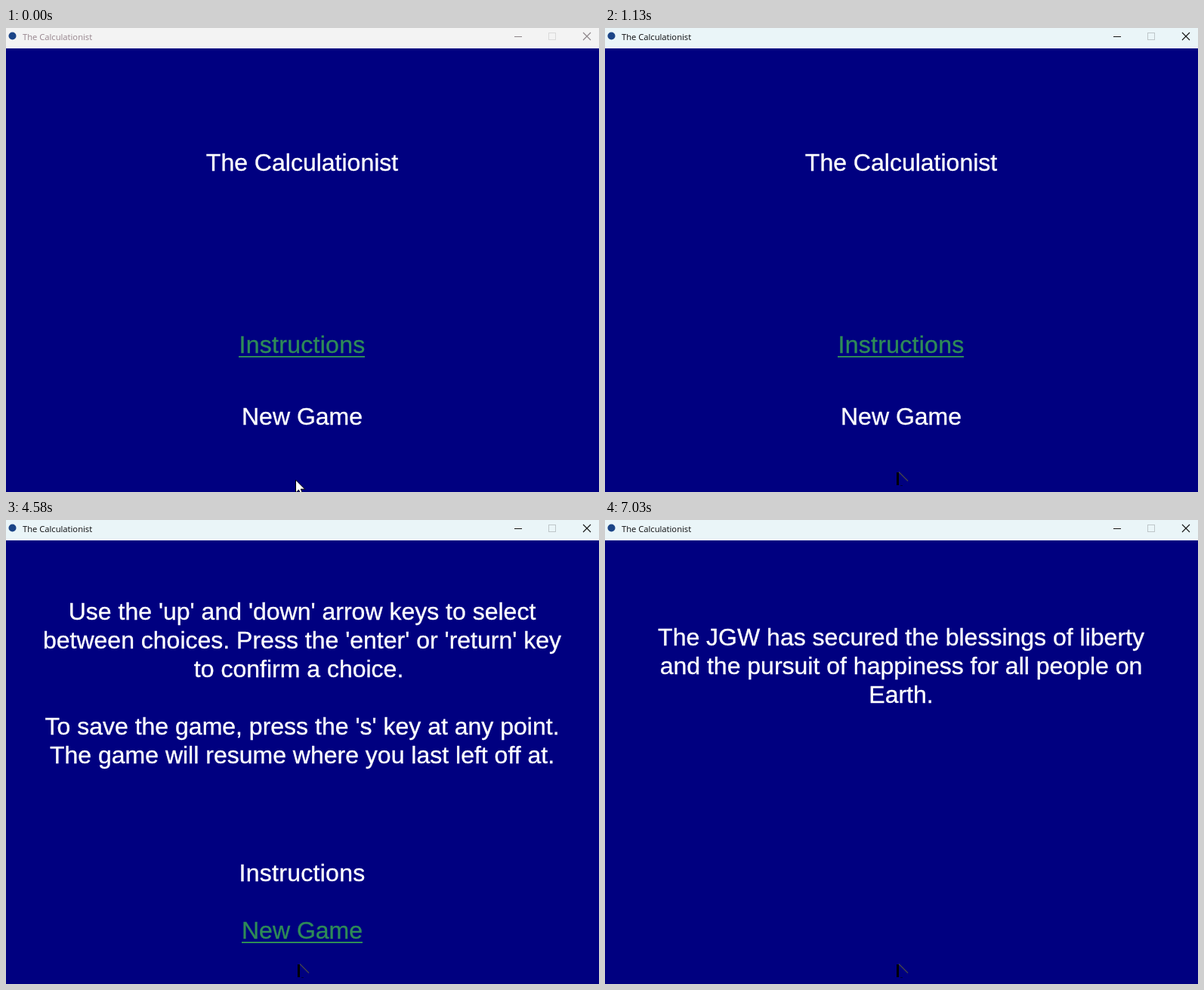
Recreate the animation shown at these times as an HTML page. Size 785 px wide and 614 px high, loop 8 s.

```html
<!DOCTYPE html>
<html lang="en">
<head>
<meta charset="utf-8">
<title>The Calculationist</title>
<style>
  html, body { margin: 0; width: 100%; height: 100%; overflow: hidden; background: #000080; }
  svg { display: block; width: 785px; height: 614px; }
  .big { font: 32px "Liberation Sans", Arial, sans-serif; text-anchor: middle; white-space: pre; stroke-width: .35px; }
  .caption { font: 11.2px "Open Sans", "Noto Sans", sans-serif; }
</style>
</head>
<body>
<svg id="stage" viewBox="0 0 785 614">
  <rect width="785" height="614" fill="#000080"/>
  <g id="scenes"></g>
  <rect id="bar" width="785" height="27"/>
  <circle cx="8.5" cy="10.5" r="5" fill="#1c4587"/>
  <text id="caption" class="caption" x="22" y="16">The Calculationist</text>
  <g id="buttons" fill="none">
    <path d="M673 11.5h10"/>
    <path d="M764 6l10 10M774 6l-10 10" stroke-width="1.1"/>
  </g>
  <rect id="box" x="718.5" y="6.5" width="9" height="9" fill="none"/>
  <path id="arrow" d="M0 0V17L4 13.2L6.6 19.4L9.4 18.2L6.8 12.2H12.2Z" fill="#fff" stroke="#000"/>
  <g id="ghost" fill="none">
    <path d="M387.5 588V605" stroke="#000" stroke-width="3"/>
    <path d="M389 587.5L401 599.5" stroke="#45454a" stroke-width="1.2"/>
    <path d="M391 605.5h3" stroke="#00003c"/>
  </g>
</svg>
<script>
const LOOP = 8000, MID = 392, PITCH = 38;
const $ = id => document.getElementById(id);

const help = [
  "Use the 'up' and 'down' arrow keys to select",
  "between choices. Press the 'enter' or 'return' key",
  "to confirm a choice. ",
  "",
  "To save the game, press the 's' key at any point.",
  "The game will resume where you last left off at."
];

// y: first baseline; menu: baselines of the two choices; pick: chosen entry
const scenes = [
  { at: 0, y: 189, lines: ["The Calculationist"], menu: [430, 525], pick: 0 },
  { at: 1920, y: 132, lines: help },
  { at: 4120, y: 132, lines: help, menu: [478, 554], pick: 0 },
  { at: 4580, y: 132, lines: help, menu: [478, 554], pick: 1 },
  { at: 5380, y: 166, lines: [
    "In the year 2206, Earth is united under one world",
    "government known as the JGW or the Joined",
    "Globe Wardenate."] },
  { at: 7030, y: 166, lines: [
    "The JGW has secured the blessings of liberty",
    "and the pursuit of happiness for all people on",
    "Earth."] }
];

const choices = [
  { label: "Instructions", left: 308, width: 167, spacing: 0.28 },
  { label: "New Game", left: 312, width: 160, spacing: 0 }
];

const moves = [[0, 383.5, 598], [240, 384, 595], [310, 385, 592], [380, 386, 588]];
const fade = { start: 860, end: 1130, steps: 5 };

function add(parent, tag, attrs, text = "") {
  const el = document.createElementNS("http://www.w3.org/2000/svg", tag);
  for (const key in attrs) el.setAttribute(key, attrs[key]);
  el.textContent = text;
  return parent.appendChild(el);
}

function addText(parent, y, color, text, spacing = 0) {
  add(parent, "text",
    { class: "big", x: MID, y, fill: color, stroke: color, "letter-spacing": spacing }, text);
}

function buildScene(scene) {
  const g = add($("scenes"), "g", {});
  scene.lines.forEach((line, i) => addText(g, scene.y + i * PITCH, "#fff", line));
  (scene.menu || []).forEach((y, i) => {
    const { label, left, width, spacing } = choices[i];
    const on = scene.pick === i, color = on ? "#2e8b57" : "#fff";
    addText(g, y, color, label, spacing);
    if (on) add(g, "rect", { x: left, y: y + 4, width, height: 2, fill: color });
  });
  return g;
}

const groups = scenes.map(buildScene);

const mix = (a, b, k) => `rgb(${a.map((v, i) => Math.round(v + (b[i] - v) * k))})`;

function focusLevel(t) {
  if (t < fade.start) return 0;
  const gap = (fade.end - fade.start) / (fade.steps - 1);
  return Math.min(1, (Math.floor((t - fade.start) / gap) + 1) / fade.steps);
}

function draw(t) {
  const current = scenes.findLastIndex(s => t >= s.at);
  groups.forEach((g, i) => g.setAttribute("visibility", i === current ? "visible" : "hidden"));

  const k = focusLevel(t);
  $("bar").setAttribute("fill", mix([243, 243, 243], [234, 245, 248], k));
  $("caption").setAttribute("fill", mix([150, 132, 140], [10, 10, 12], k));
  $("buttons").setAttribute("stroke", mix([140, 132, 136], [20, 20, 20], k));
  $("box").setAttribute("stroke", mix([218, 218, 218], [190, 198, 201], k));

  const [, x, y] = moves.findLast(m => t >= m[0]);
  $("arrow").setAttribute("transform", `translate(${x} ${y})`);
  $("arrow").setAttribute("visibility", t < fade.start ? "visible" : "hidden");
  $("ghost").setAttribute("visibility", t < fade.start ? "hidden" : "visible");
}

const begin = performance.now();
function tick() {
  draw((performance.now() - begin) % LOOP);
  requestAnimationFrame(tick);
}
tick();
</script>
</body>
</html>
```
